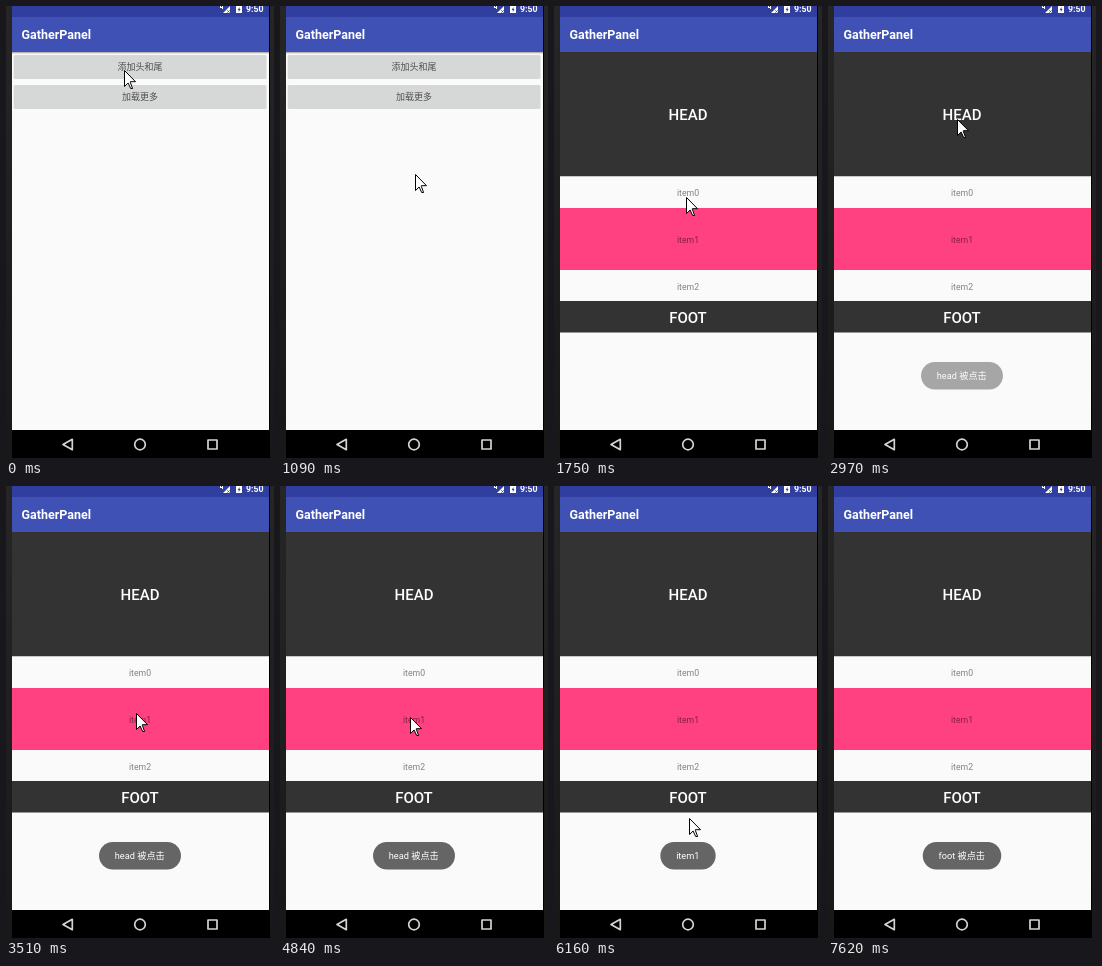
Write an HTML page that moves like this. It is 268 px wide and 452 px high and loops after 8.93 s.

```html
<!DOCTYPE html>
<html lang="en">
<head>
<meta charset="utf-8">
<style>
  html, body { margin: 0; width: 100%; height: 100%; overflow: hidden; background: #1a1a1a; }
  svg { display: block; width: 268px; height: 452px; }
  text { font-family: Roboto, "Noto Sans CJK SC", "Noto Sans CJK", sans-serif; text-anchor: middle; fill: #fff; }
  .title { font-size: 12.5px; font-weight: 700; text-anchor: start; }
  .clock { font-size: 8.8px; font-weight: 700; text-anchor: start; }
  .label { font-size: 9px; fill: #505050; }
  .big { font-size: 15px; font-weight: 500; }
  .item { font-size: 8.7px; fill: #000; fill-opacity: .48; }
  .toast { font-size: 9.2px; }
</style>
</head>
<body>
<svg viewBox="0 0 268 452">
  <defs>
    <linearGradient id="shade" x2="0" y2="1">
      <stop stop-color="#444" stop-opacity=".5"/>
      <stop offset="1" stop-color="#444" stop-opacity="0"/>
    </linearGradient>
    <linearGradient id="frame" x2="0" y2="1">
      <stop stop-color="#262626"/>
      <stop offset="1" stop-color="#181818"/>
    </linearGradient>
    <clipPath id="screen"><path d="M6 11H263V424H6Z"/></clipPath>
    <g id="bar">
      <path fill="#3f51b5" d="M6 11H263V46H6Z"/>
      <text class="title" x="15.5" y="33.2">GatherPanel</text>
    </g>
  </defs>

  <path fill="url(#frame)" d="M0 0H268V452H0Z"/>
  <path fill="#000" d="M6 0H264V452H6Z"/>
  <path fill="#303f9f" d="M6 0H263V11H6Z"/>
  <g fill="#fff">
    <path d="M224 0V7H217ZM214 0H215V1H216V0H217V3H216V2H214ZM230 0H232V-1H234V0H236V7H230Z"/>
    <path fill="#303f9f" d="M233.6 1L231.6 4H232.8V6L234.6 3H233.5Z"/>
    <path stroke="#303f9f" stroke-width=".8" d="M221.3 4.3L223.7 6.7M223.7 4.3L221.3 6.7"/>
    <text class="clock" x="240" y="6.4">9:50</text>
  </g>

  <g clip-path="url(#screen)">
    <path fill="#fafafa" d="M6 11H263V424H6Z"/>
    <path fill="url(#shade)" d="M6 46H263V48H6Z"/>
    <use href="#bar"/>
    <g fill="#d6d7d7">
      <rect x="7.7" y="49" width="252.8" height="24" rx="1.5"/>
      <rect x="7.7" y="79" width="252.8" height="24" rx="1.5"/>
    </g>
    <rect id="press" x="7.7" y="49" width="252.8" height="24" rx="1.5"/>
    <text class="label" x="134" y="64.2">添加头和尾</text>
    <text class="label" x="134" y="94.2">加载更多</text>

    <g id="list">
      <path fill="#fafafa" d="M6 11H263V460H6Z"/>
      <path fill="#333" d="M6 46H263V170.2H6ZM6 295H263V326.6H6Z"/>
      <path fill="#ff4081" d="M6 202H263V264.1H6Z"/>
      <use href="#bar"/>
      <text class="big" x="134" y="113.8">HEAD</text>
      <text class="item" x="134" y="190">item0</text>
      <text class="item" x="134" y="237">item1</text>
      <text class="item" x="134" y="284">item2</text>
      <text class="big" x="134" y="317.4">FOOT</text>
    </g>
  </g>

  <g fill="none" stroke="#d4d4d4" stroke-width="1.7" stroke-linejoin="round">
    <path d="M66.3 433.3V443.7L57 438.5ZM202 434H211V443H202Z"/>
    <circle cx="134" cy="438.5" r="5.3"/>
  </g>

  <g id="toast">
    <rect id="pill" y="356" height="27.5" rx="13.75" fill="#656565"/>
    <text id="message" class="toast" x="133.8" y="373.3"></text>
  </g>
  <path id="cursor" fill="#fff" stroke="#000" stroke-linejoin="round"
    d="M.5 .5V16.5L4.1 13L6.7 18.5H8.6L6.3 12.3V11.7H11.5Z"/>
</svg>
<script>
const LOOP = 8930, TICK = LOOP / 67, LAG = 3;
const $ = id => document.getElementById(id);
const set = (id, attrs) => {
  for (const name in attrs) $(id).setAttribute(name, attrs[name]);
};

const ramp = (n, from, to) => Math.min(1, Math.max(0, (n - from) / (to - from)));
const easeOut = (p, power = 3) => 1 - (1 - p) ** power;

const glides = [
  { from: 3, to: 5, x: 124, y: 72 },
  { from: 5, to: 7, x: 135, y: 168 },
  { from: 10, to: 13, x: 132, y: 191 },
  { from: 13, to: 17, x: 129, y: 113 },
  { from: 24, to: 27, x: 130, y: 231 },
  { from: 41, to: 43, x: 139, y: 363 },
  { from: 43, to: 45, x: 135, y: 321 },
  { from: 45, to: 46, x: 135, y: 332 },
  { from: 46, to: 49, x: 134, y: 316 }
];
const toasts = [
  { text: "head 被点击", show: 21, hide: 36 },
  { text: "item1", show: 39, hide: 52 },
  { text: "foot 被点击", show: 54, hide: 67 }
];

function cursorAt(n) {
  let x = 118, y = 64;
  for (const g of glides) {
    const p = easeOut(ramp(n, g.from, g.to));
    x += (g.x - x) * p;
    y += (g.y - y) * p;
  }
  return [Math.round(x), Math.round(y)];
}

function drawToast(n) {
  const { text, show, hide } = toasts.findLast(t => n >= t.show) || toasts[0];
  $("message").textContent = text;
  const width = $("message").getComputedTextLength() + 32;
  set("pill", { x: 134 - width / 2, width });
  set("toast", { opacity: easeOut(ramp(n, show, show + 3), 2) * (1 - ramp(n, hide, hide + 3)) });
}

function draw(t) {
  const n = Math.max(0, Math.floor((t - LAG) / TICK));
  set("cursor", { transform: `translate(${cursorAt(n)})`, opacity: n < 57 ? 1 : 0 });
  set("press", { opacity: n < 2 ? 0 : .1 * (1 - ramp(n, 6, 8)) });
  const opened = easeOut(ramp(n, 8, 10), 2);
  set("list", { opacity: opened, transform: `translate(0 ${33 * (1 - opened)})` });
  drawToast(n);
}

const start = performance.now();
function tick() {
  draw((performance.now() - start) % LOOP);
  requestAnimationFrame(tick);
}
tick();
</script>
</body>
</html>
```
